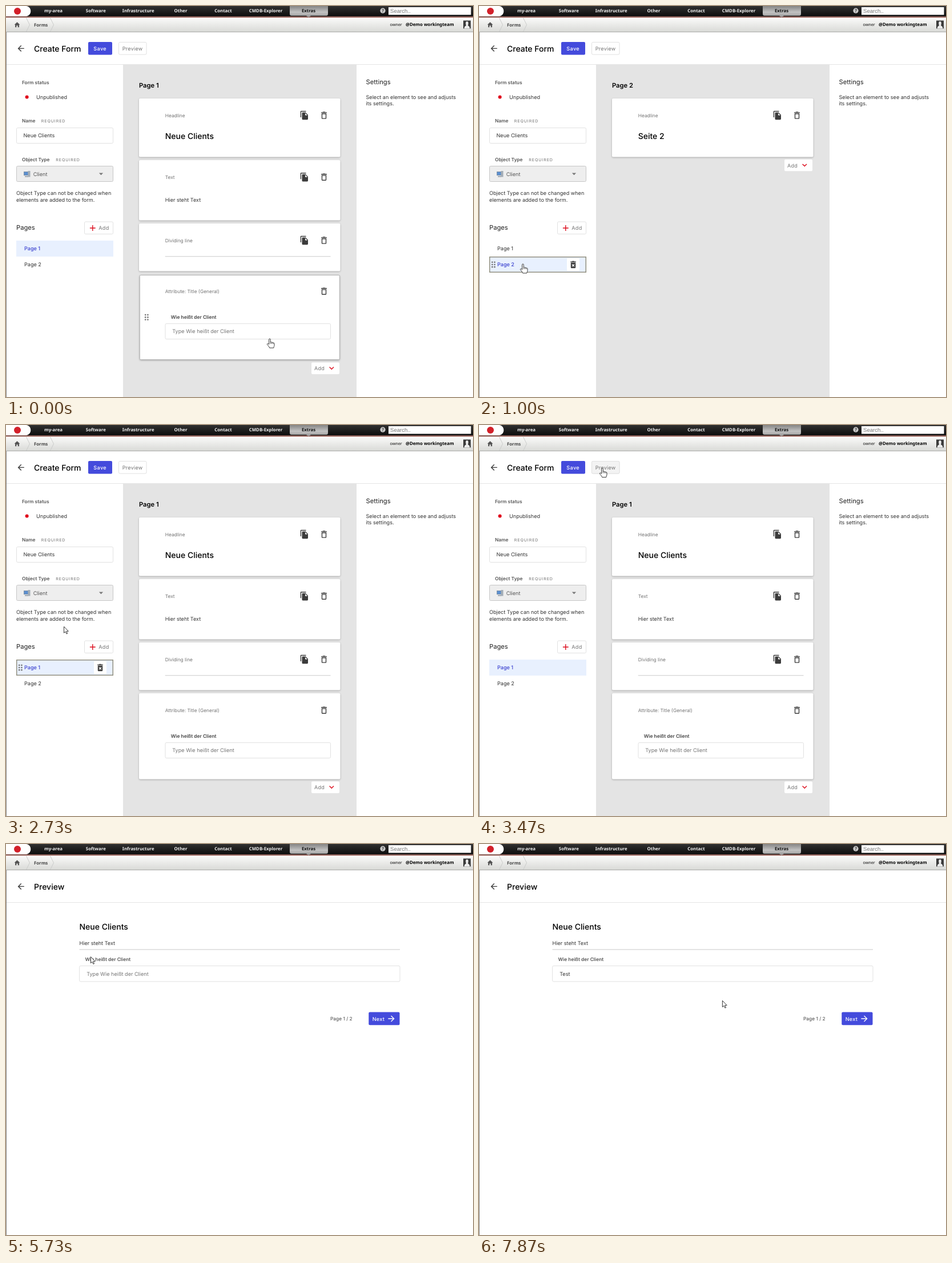
Recreate the animation shown at these times as an HTML page. Size 818 px wide and 685 px high, loop 8000 ms.

```html
<!DOCTYPE html>
<html lang="de">
<head>
<meta charset="utf-8">
<title>Form editor and preview</title>
<style>
  html, body { margin: 0; width: 100%; height: 100%; overflow: hidden; background: #fff; }
  svg { display: block; width: 100%; height: 100%; }
  text { font-family: Inter, sans-serif; text-rendering: geometricPrecision; white-space: pre; }
  .nav { font: bold 7.8px "Noto Sans", sans-serif; }
  .btn { letter-spacing: .25px; }
  .card { fill: #fff; filter: drop-shadow(0 1.5px 1.6px rgba(0, 0, 0, .27)); }
</style>
</head>
<body>
<svg id="stage" viewBox="0 0 818 685" xmlns="http://www.w3.org/2000/svg"></svg>
<script>
const LOOP = 8000, FRAME = 1000 / 15;
const BLUE = '#444bdc', RED = '#dc0c1c', DARK = '#3c3c3c', GREY = '#747474';

const ICON = {
  bin: 'M6 19c0 1.1.9 2 2 2h8c1.1 0 2-.9 2-2V7H6v12zM8 9h8v10H8V9zm7.5-5l-1-1h-5l-1 1H5v2h14V4z',
  binX: 'M6 19c0 1.1.9 2 2 2h8c1.1 0 2-.9 2-2V7H6v12zm2.46-7.12l1.41-1.41L12 12.59l2.12-2.12 1.41 1.41L13.41 14l2.12 2.12-1.41 1.41L12 15.41l-2.12 2.12-1.41-1.41L10.59 14l-2.13-2.12zM15.5 4l-1-1h-5l-1 1H5v2h14V4z',
  copy: 'M16 1H4c-1.1 0-2 .9-2 2v14h2V3h12V1zm-1 4l6 6v10c0 1.1-.9 2-2 2H7.99C6.89 23 6 22.1 6 21l.01-14c0-1.1.89-2 1.99-2h7zm-1 7h5.5L14 6.5V12z',
  back: 'M20 11H7.83l5.59-5.59L12 4l-8 8 8 8 1.41-1.41L7.83 13H20v-2z',
  next: 'M12 4l-1.41 1.41L16.17 11H4v2h12.17l-5.58 5.59L12 20l8-8z',
  down: 'M16.59 8.59L12 13.17 7.41 8.59 6 10l6 6 6-6z',
  plus: 'M19 13h-6v6h-2v-6H5v-2h6V5h2v6h6v2z'
};

const text = (x, y, s, size = 9.1, fill = '#333', weight = 400, extra = '') =>
  `<text x="${x}" y="${y}" font-size="${size}" fill="${fill}" font-weight="${weight}" ${extra}>${s}</text>`;
const nav = (x, y, s, fill, extra = '') =>
  `<text class="nav" x="${x}" y="${y}" fill="${fill}" ${extra}>${s}</text>`;
const box = (x, y, x2, y2, fill, extra = '') =>
  `<rect x="${x}" y="${y}" width="${x2 - x}" height="${y2 - y}" fill="${fill}" ${extra}/>`;
const icon = (name, cx, cy, fill = DARK, k = .7) =>
  `<path d="${ICON[name]}" fill="${fill}" fill-rule="evenodd" transform="translate(${cx - 12 * k} ${cy - 12 * k}) scale(${k})"/>`;
const dots = (cx, cy) => [0, 1, 2, 3, 4, 5].map(i =>
  `<circle cx="${cx - 2.1 + i % 2 * 4.2}" cy="${cy - 4.2 + (i >> 1) * 4.2}" r="1.35" fill="${GREY}"/>`).join('');
// Visible only inside the listed "from-to" spans, in ms.
const during = (spans, body) => `<g data-on="${spans}">${body}</g>`;
const line = (x, x2, y) => box(x, y, x2, y + 1, '#c9c9c9');
const field = (x, y, x2, y2, fill = '#fff', stroke = '#e1e1e1', extra = '') =>
  box(x, y, x2, y2, fill, `rx="2" stroke="${stroke}" ${extra}`);

function topBar() {
  const items = [['my-area', 83], ['Software', 157.3], ['Infrastructure', 231.7], ['Other', 306],
                 ['Contact', 380.5], ['CMDB-Explorer', 455]];
  const mid = 'text-anchor="middle"';
  return `<defs>
    <linearGradient id="bar" x2="0" y2="1"><stop stop-color="#303030"/><stop offset="1" stop-color="#0c0c0c"/></linearGradient>
    <linearGradient id="tab" x2="0" y2="1"><stop stop-color="#858585"/><stop offset=".55" stop-color="#c2c2c2"/><stop offset="1" stop-color="#939393"/></linearGradient>
    <linearGradient id="crumb" x2="0" y2="1"><stop stop-color="#fbfbfa"/><stop offset="1" stop-color="#d9dad7"/></linearGradient></defs>`
    + box(0, 0, 818, 18.5, 'url(#bar)') + box(0, 18.5, 818, 20.5, '#8d4c42')
    + box(0, 20.5, 818, 45, 'url(#crumb)') + box(0, 45, 818, 46, '#a9aaa8')
    + `<path d="M0 0H35C46 1 46 17 35 18H0Z" fill="#fff"/><circle cx="20" cy="9" r="6" fill="#d3202a"/>`
    + items.map(([s, x]) => nav(x, 10.6, s, '#f2f2f2', mid)).join('')
    + `<path d="M497 0H564V14Q564 17 561 17H534L530 20L526 17H500Q497 17 497 14Z" fill="url(#tab)"/>`
    + nav(530, 10.8, 'Extras', '#111', mid)
    + `<circle cx="660" cy="8.2" r="4.6" fill="#c9c9c9"/>` + nav(660, 11, '?', '#333', mid)
    + box(670, 2, 814.5, 15.5, '#fff')
    + text(673, 12, 'Search..', 9.6, '#777', 400, 'style="font-family:\'Liberation Sans\',sans-serif"')
    + `<path d="M19.5 28.2L14.6 32.8H16V37.2H18.3V34.2H20.7V37.2H23V32.8H24.4Z" fill="#555"/>`
    + `<path d="M35.5 21L41.5 33L35.5 45M77.5 21L83.5 33L77.5 45" fill="none" stroke="#cbcccb"/>`
    + nav(49, 35.8, 'Forms', '#444')
    + nav(672.5, 35.4, 'owner', '#111', 'style="font-weight:400;font-size:7.2px"')
    + nav(700, 35.4, '@Demo workingteam', '#000')
    + box(801, 25.5, 814, 39.5, '#3b3b3b')
    + `<path d="M802.5 39.5Q803 35 806 34.5Q803.8 27 807.5 27Q811.2 27 809 34.5Q812 35 812.5 39.5Z" fill="#eee"/>`;
}

function frame() {
  return box(0, 46, 1, 685, '#858585') + box(1, 102, 818, 103, '#e4e4e4') + icon('back', 26.2, 74.4);
}

function pageRow(y, label, { selected, plain, hover, bin }) {
  return during(hover, box(18, y, 188, y + 28, '#eeeeee'))
    + during(selected, box(18, y, 188, y + 28, '#e8f0fe') + text(32, y + 17.4, label, 9.1, '#3c43d0', 500))
    + during(plain, text(32, y + 17.4, label))
    + during(hover, dots(25.3, y + 14) + box(154, y + 3, 176, y + 25, '#fff', 'opacity=".3"') + icon('binX', 165, y + 14, '#b9b9b9'))
    + during(bin, box(154, y + 3, 176, y + 25, '#fff', 'rx="2"') + icon('binX', 165, y + 14))
    + during(hover, box(18.7, y + .7, 187.3, y + 27.3, 'none', 'stroke="#8c8a78" stroke-width="1.4"'));
}

function sidePanels() {
  const label = (y, s) => text(28, y, s, 8.3, '#555', 600);
  const required = (x, y) => text(x, y, 'REQUIRED', 7, GREY, 400, 'letter-spacing=".95"');
  return label(136.6, 'Form status') + `<circle cx="36.6" cy="159.5" r="3" fill="#e0001b"/>`
    + text(53, 163, 'Unpublished')
    + label(204.4, 'Name') + required(61.8, 204.2)
    + field(18.5, 213.5, 187.5, 240.5) + text(30.5, 230.3, 'Neue Clients')
    + label(271.8, 'Object Type') + required(87.3, 271.6)
    + field(18.5, 280.5, 187.5, 307.5, '#eeeeee', '#c6c6c6')
    + box(31, 290, 39.5, 297, '#8093a8') + box(32, 291, 38.5, 296, '#5b8fd0') + box(33, 298, 39, 299.5, '#8d969f') + box(38.5, 289, 42.5, 299.5, '#a4adb6')
    + text(47.7, 297.6, 'Client', 9.1, '#555') + `<path d="M162.8 292.5H170.2L166.5 296.3Z" fill="#777"/>`
    + text(18, 331.4, 'Object Type can not be changed when') + text(18, 343.3, 'elements are added to the form.')
    + text(18, 391.6, 'Pages', 11.2, '#222')
    + field(137.5, 378, 187.5, 399.5) + icon('plus', 151.8, 389, RED)
    + text(162.3, 392.4, 'Add', 9.1, GREY, 400, 'class="btn"')
    + pageRow(411, 'Page 1', { selected: '0-1000,2070-3870', plain: '1000-2070', hover: '1670-2800', bin: '2070-2800' })
    + pageRow(439, 'Page 2', { selected: '1000-2070', plain: '0-1000,2070-3870', hover: '600-1670', bin: '1000-2070' })
    + text(630.5, 136.8, 'Settings', 11.2, '#222')
    + text(630.5, 162.8, 'Select an element to see and adjusts') + text(630.5, 174.4, 'its settings.');
}

const card = (y, y2, x = 233, x2 = 585.5, extra = '') => box(x, y, x2, y2, '#fff', `class="card" rx="2" ${extra}`);
const cardHead = (y, s, copy = true) => text(278.7, y + 3, s, 8.4, GREY)
  + icon('bin', 557, y) + (copy ? icon('copy', 522.7, y) : '');
const title = (x, y, s) => text(x, y, s, 14, '#000', 500);
const addMenu = y => box(535, y, 584, y + 20.5, '#fff', 'rx="2"')
  + text(540, y + 13.8, 'Add', 9.1, GREY, 400, 'class="btn"') + icon('down', 570.3, y + 10, RED);
const headline = s => card(162, 264.5) + cardHead(191.5, 'Headline') + title(278.7, 233, s);
const pageName = s => text(233, 142.7, s, 11.2, '#000', 600);

function pageOne() {
  return pageName('Page 1') + headline('Neue Clients')
    + card(270, 375.5) + cardHead(299.7, 'Text') + text(278.7, 342.6, 'Hier steht Text')
    + card(381, 464.5) + cardHead(410.5, 'Dividing line') + line(278.7, 568.5, 438.3)
    + during('0-400', card(471.5, 619.5, 234.3, 584.3, 'stroke="#b2b2b2"') + dots(246.3, 545.3))
    + during('400-3870', card(470, 620.5))
    + cardHead(499.7, 'Attribute: Title (General)', false)
    + text(288.8, 547.5, 'Wie heißt der Client', 8.4, '#444', 600)
    + field(279, 556.5, 568.5, 583.5) + text(291.3, 573.4, 'Type Wie heißt der Client', 9.1, GREY)
    + addMenu(624.5);
}

function editor() {
  return title(49, 79.5, 'Create Form')
    + box(144, 63, 186, 85.5, BLUE, 'rx="2"') + text(153.2, 77.9, 'Save', 9.1, '#fff', 500, 'letter-spacing=".4"')
    + field(197.5, 63.5, 246, 85) + during('3200-3870', field(197.5, 63.5, 246, 85, '#f3f3f3'))
    + text(203.7, 77.9, 'Preview', 9.1, GREY, 400, 'class="btn"')
    + box(205, 103, 614, 685, '#e4e4e4') + sidePanels()
    + during('0-1000,2070-3870', pageOne())
    + during('1000-2070', pageName('Page 2') + headline('Seite 2') + addMenu(268.8));
}

function preview() {
  return title(49, 79.5, 'Preview') + title(128.5, 150.2, 'Neue Clients')
    + text(128.5, 177, 'Hier steht Text') + line(128.5, 690, 184.4)
    + text(138.5, 205, 'Wie heißt der Client', 8.4, '#555', 600)
    + field(128.7, 213.5, 690, 241)
    + during('5870-6200', field(128.7, 213.5, 690, 241, 'none', '#a5a5a5'))
    + during('6200-7870', field(128.9, 213.7, 689.8, 241, 'none', BLUE, 'stroke-width="1.3"'))
    + during('3870-6870', text(141.2, 231, 'Type Wie heißt der Client', 9.1, GREY))
    + text(141.2, 231, '', 9.1, '#333', 400, 'id="typed"')
    + during('6200-6730,6870-7860', `<rect id="caret" y="222.3" width=".9" height="10.7" fill="#222"/>`)
    + text(568, 309, 'Page 1 / 2', 8.4, '#444')
    + box(635.3, 294.5, 689.5, 317.3, BLUE, 'rx="2"')
    + text(641.7, 309.6, 'Next', 9.1, '#fff', 500, 'class="btn"') + icon('next', 675, 306, '#fff');
}

function pointer() {
  const shape = (d, extra = '') => `<path d="${d}" fill="#fff" stroke="#222" stroke-width=".9" stroke-linejoin="round" ${extra}/>`;
  return `<g id="pointer">`
    + during('400-600,2730-3200,3870-5870,7400-8000', shape('M.4.4V11.6L3 9.3L4.9 13.3L6.6 12.5L4.8 8.6H8.2Z'))
    + during('0-400,600-2730,3200-3870', shape('M-1.4 1.1C-1.4-.4 1.2-.4 1.2 1.1V6.2C1.6 5.2 3.5 5.4 3.6 6.7C4.2 5.9 5.9 6.1 6 7.4C6.6 6.8 8 7 8 8.4V11.5C8 13 7 13.8 6.8 16H-.4C-.6 14-4.4 10.5-4.6 9.6C-4.8 8.2-3 8-1.4 9.8Z')
      + '<path d="M1.2 6.2V9M3.6 6.7V9M6 7.4V9.2" fill="none" stroke="#222" stroke-width=".8"/>')
    + during('5870-7400', `<path d="M-2.5-7H-.6L0-6.4L.6-7H2.5M0-6.4V6.4M-2.5 7H-.6L0 6.4L.6 7H2.5" fill="none" stroke="#222"/>`)
    + '</g>';
}

const ease = {
  in: u => u * u,
  out: u => 1 - (1 - u) ** 2,
  both: u => u * u * (3 - 2 * u)
};
// Pointer stops: time, x, y, easing on the way there.
const path = [
  [0, 462, 583], [733, 77, 452, 'both'],
  [1470, 77, 452], [1733, 77, 432, 'both'],
  [2600, 77, 432], [2733, 101, 353, 'in'], [3470, 216, 75.5, 'out'],
  [4400, 216, 75.5], [4870, 121, 150, 'both'], [5267, 129, 157, 'out'],
  [5733, 148, 197, 'both'], [6067, 156, 236, 'out'],
  [7330, 156, 236], [7667, 426, 274, 'both'], [LOOP, 426, 274]
];
const keys = [[6870, 'T'], [7000, 'Te'], [7270, 'Tes'], [7330, 'Test']];

function pointerAt(t) {
  const i = path.findIndex(p => p[0] > t);
  const [t0, x0, y0] = path[i - 1], [t1, x1, y1, how = 'both'] = path[i];
  const u = ease[how]((t - t0) / (t1 - t0));
  return [x0 + (x1 - x0) * u, y0 + (y1 - y0) * u];
}

const $ = id => document.getElementById(id);
$('stage').innerHTML = box(0, 0, 818, 685, '#fff') + topBar() + during('0-3870', editor())
  + during('3870-8000', preview()) + frame() + pointer();

const timed = [...document.querySelectorAll('[data-on]')].map(el => ({
  el, spans: el.dataset.on.split(',').map(s => s.split('-').map(Number))
}));

function draw(now) {
  const t = now % LOOP;
  for (const { el, spans } of timed)
    el.style.display = spans.some(([a, b]) => t >= a && t < b) ? '' : 'none';
  const step = Math.floor((t + 3.4) / FRAME) * FRAME;
  const [x, y] = pointerAt(Math.min(step, LOOP - 1));
  $('pointer').setAttribute('transform', `translate(${x.toFixed(1)} ${y.toFixed(1)})`);
  const typed = keys.filter(k => t >= k[0]).pop()?.[1] ?? '';
  $('typed').textContent = typed;
  $('caret').setAttribute('x', 141.2 + (typed ? $('typed').getComputedTextLength() + .3 : 0));
}

const start = performance.now();
function tick() {
  draw(performance.now() - start);
  requestAnimationFrame(tick);
}
tick();
</script>
</body>
</html>
```
